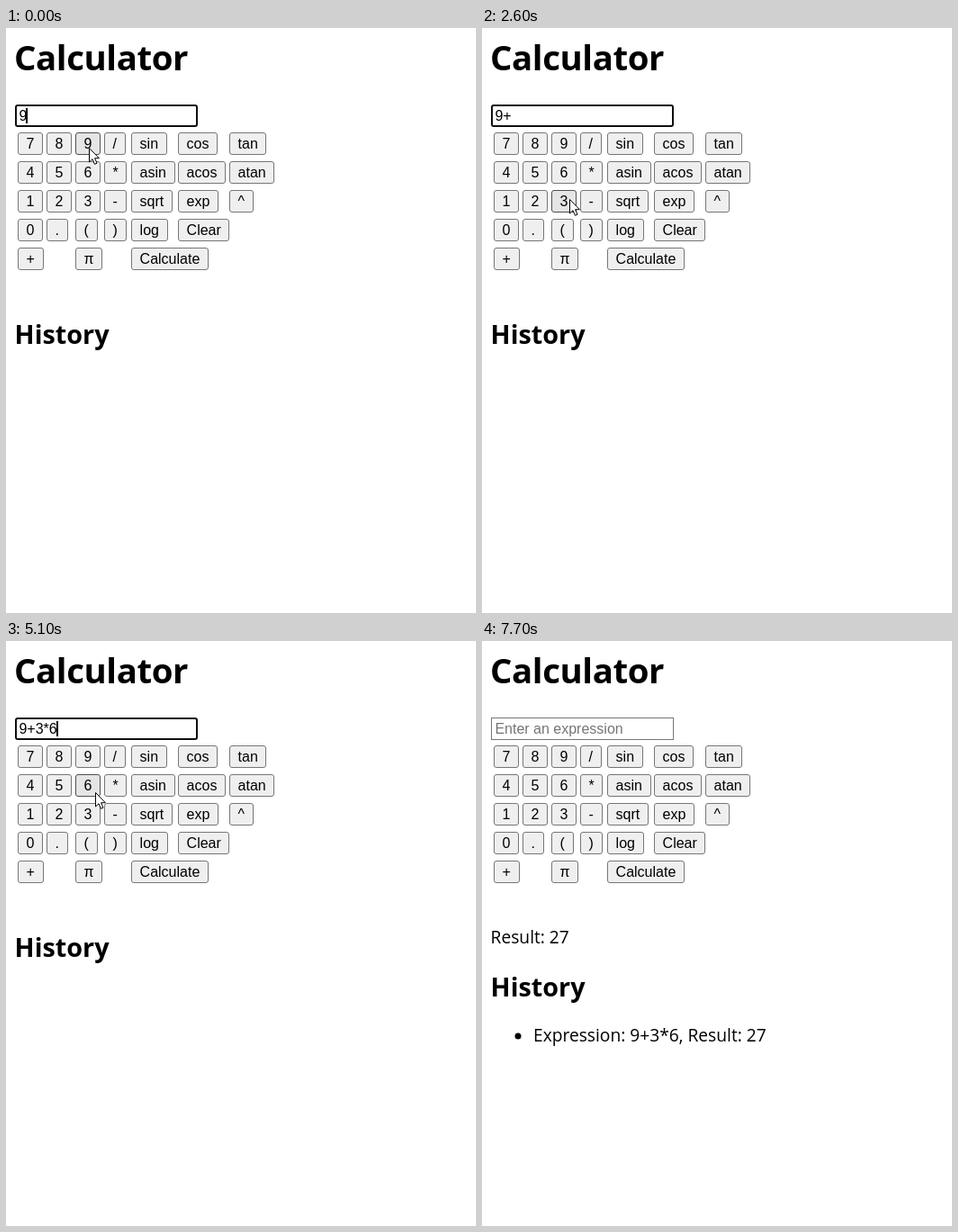
These frames come from a looping animation (522x650 px, 9 s). An HTML page:

```html
<!DOCTYPE html>
<html lang="en">
<head>
<meta charset="utf-8">
<title>Calculator</title>
<style>
  html, body { margin: 0; width: 100%; height: 100%; overflow: hidden; background: #fff; }
  #stage { position: relative; width: 522px; height: 650px; overflow: hidden; color: #000; }
  #stage, .key, #field { cursor: default; }
  svg { position: absolute; left: 0; top: 0; font: 19.2px "Open Sans", "Noto Sans", sans-serif; }
  .h1 { font-size: 38.4px; font-weight: 700; letter-spacing: -.4px; }
  .h2 { font-size: 28.8px; font-weight: 700; }
  .key, #field {
    position: absolute; box-sizing: border-box; height: 25px;
    font: 16px/23px "Liberation Sans", Arial, sans-serif; white-space: pre;
    border: 1px solid #767676;
  }
  .key { padding: 0 8.6px; border-radius: 3px; background: #efefef; }
  .key.hover { background: #e5e5e5; border-color: #4f4f4f; }
  #field { left: 10px; top: 85px; width: 203px; padding-left: 3.4px; color: #757575; }
  #field.focus {
    border: 2px solid #101010; border-radius: 3px;
    padding-left: 2.4px; line-height: 21px; color: #000;
  }
  #caret {
    display: inline-block; width: 2px; height: 17px; margin-left: -1px;
    vertical-align: -3px; background: #000;
  }
</style>
</head>
<body>
<div id="stage">
  <div id="field"><span id="entry"></span><span id="caret"></span></div>
  <svg width="522" height="650">
    <text class="h1" x="9" y="47">Calculator</text>
    <text class="h2" id="history" x="9.6" y="351">History</text>
    <g id="result">
      <text x="9.6" y="336">Result: 27</text>
      <circle cx="40" cy="439" r="3.5"/>
      <text x="57" y="445">Expression: 9+3*6, Result: 27</text>
    </g>
  </svg>
  <svg width="522" height="650">
    <path id="pointer" d="M.5.5V16L4 12.7 6.4 18.3 9 17.2 6.6 11.7H11.4Z"
          fill="#fff" stroke="#000" stroke-linejoin="round"/>
  </svg>
</div>
<script>
  const LOOP = 9000, STEP = 100, SOLVED = 6100, LEAVE = 7700;
  const columns = [13, 45, 77, 109, 139, 191, 248];
  const rows = [
    ['7', '8', '9', '/', 'sin', 'cos', 'tan'],
    ['4', '5', '6', '*', 'asin', 'acos', 'atan'],
    ['1', '2', '3', '-', 'sqrt', 'exp', '^'],
    ['0', '.', '(', ')', 'log', 'Clear'],
    ['+', '', 'π', '', 'Calculate'],
  ];

  // [time, text]; each entry restarts the caret blink
  const typed = [[-300, '9'], [1700, '9+'], [2800, '9+3'], [3600, '9+3*'], [4700, '9+3*6']];

  // [start, end, x, y] of each pointer move
  const moves = [
    [0, 0, 92, 133],
    [400, 1400, 17, 259],
    [1900, 2600, 97, 190],
    [2900, 3400, 119, 162],
    [3700, 4400, 94, 161],
    [5000, 5600, 156, 255],
  ];
  const exit = [7200, 7600, 395, 502];

  const get = id => document.getElementById(id);
  const stage = get('stage'), field = get('field'), entry = get('entry'), caret = get('caret');
  const history = get('history'), result = get('result'), pointer = get('pointer');

  const keys = rows.flatMap((labels, row) => labels.map((label, col) => {
    if (!label) return null;
    const key = document.createElement('div');
    key.className = 'key';
    key.textContent = label;
    key.style.left = columns[col] + 'px';
    key.style.top = 116 + 32 * row + 'px';
    stage.insertBefore(key, stage.lastElementChild);
    return key;
  })).filter(Boolean);

  const boxes = keys.map(key => ({
    key, x: key.offsetLeft, y: key.offsetTop, w: key.offsetWidth, h: key.offsetHeight,
  }));

  const clamp = v => Math.min(1, Math.max(0, v));
  const smooth = v => v * v * (3 - 2 * v);

  function pointerAt(t) {
    let [, , x, y] = moves[0];
    const travel = ([start, end, toX, toY], ease) => {
      const p = ease(clamp((t - start) / (end - start)));
      x += (toX - x) * p;
      y += (toY - y) * p;
    };
    moves.slice(1).forEach(move => travel(move, smooth));
    travel(exit, p => p);
    return [x, y];
  }

  function draw(t) {
    const solved = t >= SOLVED, gone = t >= LEAVE;
    const [since, text] = typed.filter(([time]) => time <= t).pop();
    const [x, y] = pointerAt(t);

    field.classList.toggle('focus', !solved);
    entry.textContent = solved ? 'Enter an expression' : text;
    caret.style.visibility = !solved && (t - since) % 1000 < 500 ? 'visible' : 'hidden';
    history.setAttribute('y', solved ? 395 : 351);
    result.style.display = solved ? '' : 'none';
    pointer.style.display = gone ? 'none' : '';
    pointer.setAttribute('transform', `translate(${Math.round(x)} ${Math.round(y)})`);
    for (const b of boxes) {
      const over = x >= b.x && x < b.x + b.w && y >= b.y && y < b.y + b.h;
      b.key.classList.toggle('hover', over && !gone);
    }
  }

  const began = performance.now();
  function tick() {
    const t = (performance.now() - began) % LOOP;
    draw(Math.floor(t / STEP) * STEP);
    requestAnimationFrame(tick);
  }
  tick();
</script>
</body>
</html>
```
